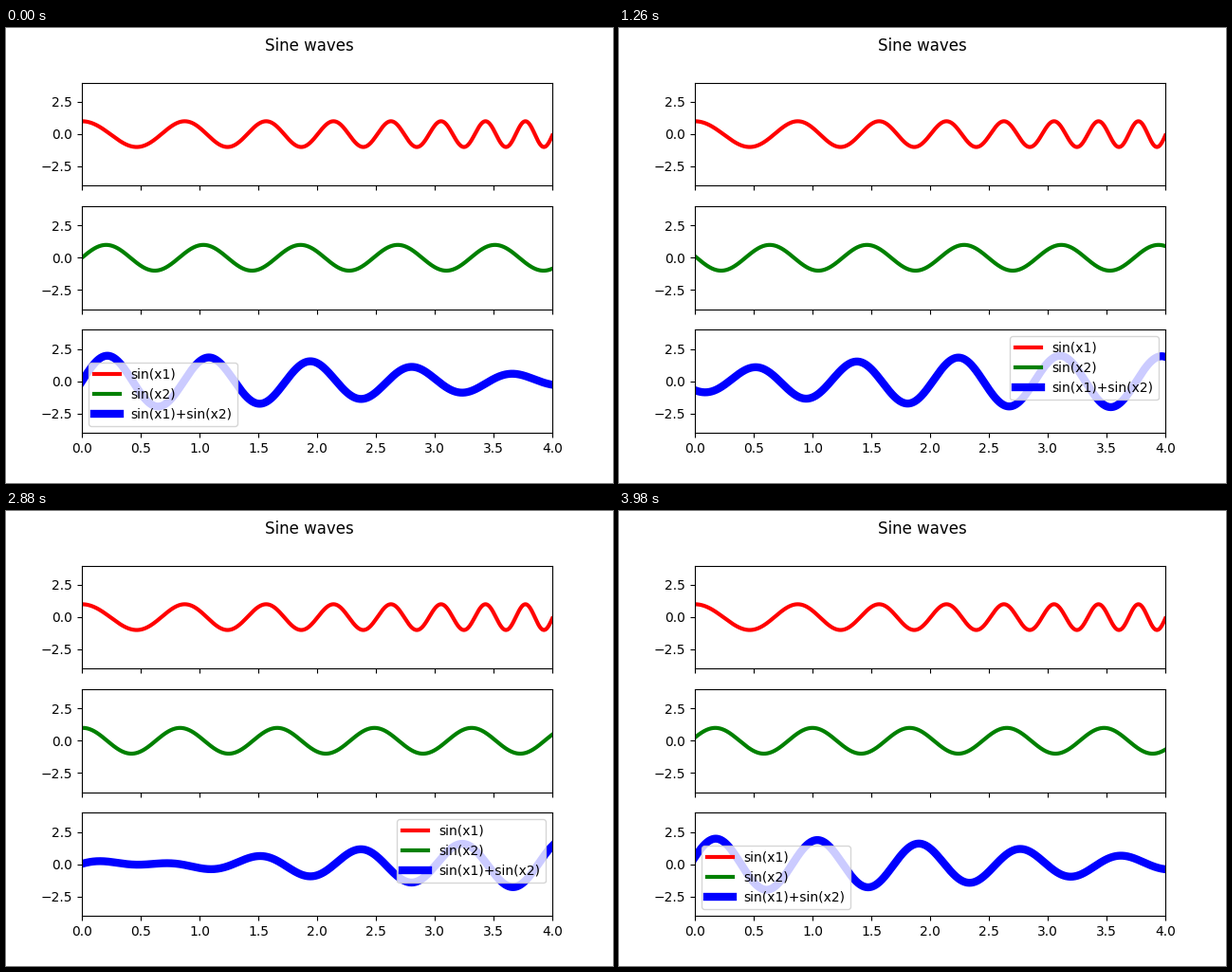
Write a matplotlib script that moves like this. It is 640 px wide and 480 px high and loops after 4 s.

```python
import numpy as np
import matplotlib.pyplot as plt
from matplotlib.animation import FuncAnimation

FRAMES = 200
INTERVAL = 20  # ms
TAU = 2 * np.pi

x = np.linspace(0, 4, 1000)


def wave(freq, speed, i):
    return np.sin(TAU * (freq * x - speed * i))


def chirp(rate):
    """Cosine whose frequency grows exponentially from 1."""
    return np.cos(TAU * (np.exp(rate * x) - 1) / rate)


fig, axes = plt.subplots(3, 1, sharex=True, figsize=(6.4, 4.8), dpi=100)
fig.suptitle("Sine waves")
for ax in axes:
    ax.set_xlim(0, 4)
    ax.set_ylim(-4, 4)

line1, = axes[0].plot(x, chirp(0.3), color="red", lw=3)
line2, = axes[1].plot(x, wave(1.21, 0.04, 0), color="green", lw=3)
line3, = axes[2].plot(x, wave(1.1, 0.05, 0) + wave(1.21, 0.04, 0),
                      color="blue", lw=6)

# "best" is re-evaluated on each draw, so the legend hops around the curve
axes[2].legend([line1, line2, line3],
               ["sin(x1)", "sin(x2)", "sin(x1)+sin(x2)"], loc="best")


def update(i):
    y2 = wave(1.21, 0.04, i)
    line2.set_ydata(y2)
    line3.set_ydata(wave(1.1, 0.05, i) + y2)
    return line2, line3


anim = FuncAnimation(fig, update, frames=FRAMES, interval=INTERVAL,
                     repeat=True, repeat_delay=0, blit=False)
plt.show()
```
